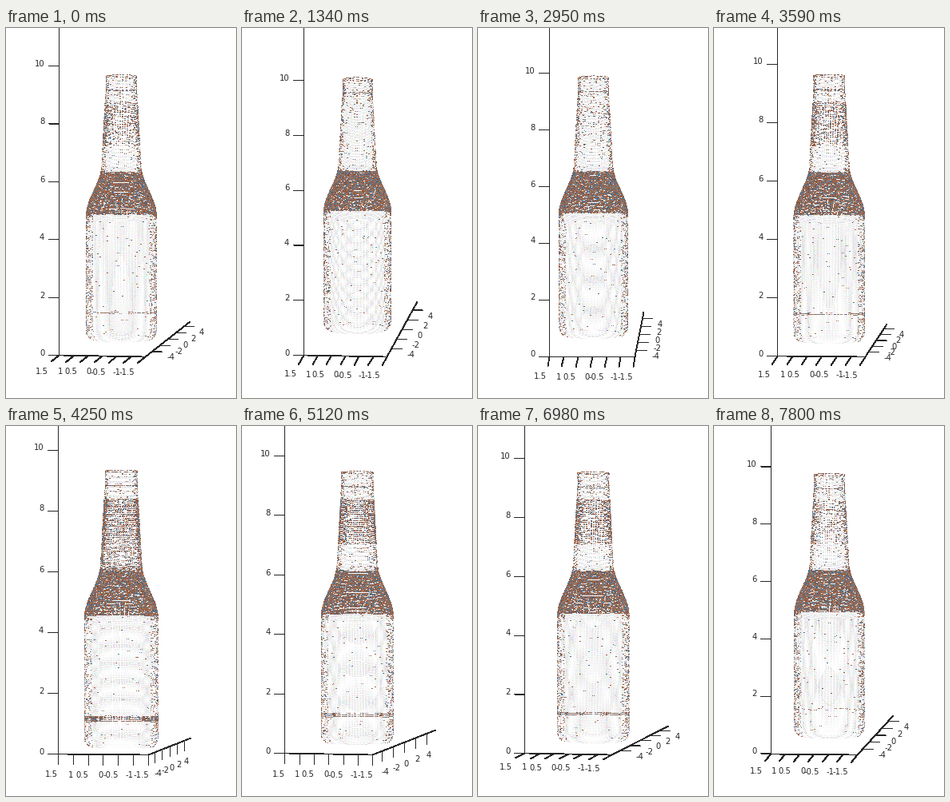
Write a matplotlib script that moves like this. It is 288 by 463 pixels and loops after 9.24 s.

```python
import numpy as np
import matplotlib.pyplot as plt
from matplotlib.animation import FuncAnimation
from matplotlib.colors import hsv_to_rgb

W, H, DPI = 288, 463, 64
PX = 72 / DPI                # one pixel in points
LOOP, STEP = 9240, 30
XR, YR = 1.5, 5.7            # half ranges of the floor
CX, FLOOR = 148.4, 411.5     # screen centre and lowest corner
TICK = 13
INK = "#262626"

# Drag path: time, azimuth, elevation
PATH = np.array([
    (650, 7.75, 6.2), (720, 5.9, 7.2), (1340, 5.5, 10), (2160, 0.2, 9.3),
    (2600, 0.2, 9.2), (3590, 3.7, 5.65), (4220, 7, 2.8), (5120, 10.7, 4.25),
    (5600, 12.6, 3.15), (6190, 12.6, 3.15), (7730, 6.27, 6.87)])

rng = np.random.default_rng(7)


def smooth(u):
    u = np.clip(u, 0, 1)
    return u * u * (3 - 2 * u)


def radius(z):
    """Bottle outline: rounded foot, body, shoulder, tapering neck, lip."""
    neck = 0.69 - 0.055 * (z - 5.75)
    r = 1.21 + (neck - 1.21) * smooth((z - 4.2) / 1.7)
    r -= 0.13 * np.clip(1 - z / 0.25, 0, 1) ** 2
    return np.where(z > 8.45, 0.53, r)


def rings(z0, z1, dz, n):
    th = np.linspace(0, 2 * np.pi, n, endpoint=False)
    z, th = np.meshgrid(np.arange(z0, z1, dz), th, indexing="ij")
    return np.array([z.ravel(), th.ravel()])


Z, TH = np.hstack([rings(0, 4.15, 0.055, 200), rings(4.15, 5.85, 0.035, 230),
                   rings(5.85, 9.05, 0.045, 90)])
N = Z.size
BX, BY = 0.11 + radius(Z) * np.cos(TH), radius(Z) * np.sin(TH)
CHANCE = np.repeat(rng.random(N // 2 + 1), 2)[:N]

# Browns with some slate blue; pastels of any hue
HUE = np.where(rng.random(N) < 0.72, rng.uniform(0.03, 0.08, N),
               rng.uniform(0.55, 0.6, N))
DARK = hsv_to_rgb(np.stack([HUE, rng.uniform(0.35, 0.65, N),
                            rng.uniform(0.5, 0.72, N)], axis=1))
LIGHT = hsv_to_rgb(np.stack([rng.random(N), np.full(N, 0.13),
                             np.full(N, 0.93)], axis=1))


class Camera:
    """Orthographic view scaled so that the whole box fits in height."""

    def __init__(self, az, el):
        a, e = np.radians((az, el))
        self.ca, self.sa, self.ce, self.se = np.cos(a), np.sin(a), np.cos(e), np.sin(e)
        self.s = 528 / (13.3 * self.ce + 2 * self.se * (YR * self.ca + XR * self.sa))
        self.base = FLOOR - self.s * self.se * (YR * self.ca + XR * self.sa)

    def __call__(self, x, y, z):
        depth = y * self.ca + x * self.sa
        return np.array([CX + self.s * (y * self.sa - x * self.ca),
                         self.base - self.s * (z * self.ce + depth * self.se)])


def view(t):
    """The picture is redrawn every 90 ms while dragging."""
    held = t - (t - 80) % 90
    return [np.interp(held, PATH[:, 0], PATH[:, i]) for i in (1, 2)]


def strength(level, edge, el):
    """Share of points in full colour; flat views let the rows pile up."""
    low = np.clip((8.5 - el) / 4.5, 0, 1)
    side = 0.17 * (edge > 0.8)
    band = np.abs(level - 0.89) < 0.03 + 0.07 * np.clip((6 - el) / 3, 0, 1)
    rim = (np.abs(level - 8.57) < 0.03) | (level > 9)
    return np.select(
        [band, level < 4.28, level < 5.74, level < 6.65, level < 8.15, rim],
        [0.85 * np.clip((7.8 - el) / 2.5, 0, 1), 0.012 + side, 0.82,
         0.04 + side + 0.42 * np.clip((4.4 - el) / 1.2, 0, 1),
         0.05 + side + 0.62 * low, 0.7], 0.07 + side)


def bottle(cam, el):
    x, y = cam(BX, BY, Z)
    px, py = x.astype(int), y.astype(int)
    edge = np.abs(np.cos(TH) * cam.ca - np.sin(TH) * cam.sa)
    level = (cam.base - y) / (cam.s * cam.ce)
    on = CHANCE < strength(level, edge, el)
    # Pale dots fade with their place between pixel rows, which gives moire arcs
    fade = 2 * np.abs(y % 1 - 0.5)[:, None]
    pale = 1 - fade * (1 - LIGHT)
    img = np.ones((H, W, 3))
    img[py[~on], px[~on]] = pale[~on]
    img[py[on], px[on]] = DARK[on]
    return img


fig = plt.figure(figsize=(W / DPI, H / DPI), dpi=DPI, facecolor="white")
ax = fig.add_axes([0, 0, 1, 1])
ax.axis("off")
im = ax.imshow(np.ones((H, W, 3)), extent=(0, W, H, 0),
               interpolation="nearest", aspect="auto")
ax.set(xlim=(0, W), ylim=(H, 0))
box, = ax.plot([], [], color=INK, lw=0.8 * PX, antialiased=False,
               solid_capstyle="butt")


def labels(values, ha):
    return [(v, ax.text(0, 0, f"{v:g}", ha=ha, va="baseline", color=INK,
                        family="DejaVu Sans", fontsize=10 * PX))
            for v in values]


XT = labels(np.arange(1.5, -1.6, -0.5), "right")
YT = labels(range(-4, 5, 2), "left")
ZT = labels(range(0, 11, 2), "right")


def place(text, x, y):
    text.set_position((x, y + 3.6))


def update(n):
    az, el = view(n * STEP + 25)
    cam = Camera(az, el)
    im.set_data(bottle(cam, el))

    left, right, far = cam(XR, -YR, 0), cam(-XR, -YR, 0), cam(-XR, YR, 0)
    run, rise = far[0] - right[0], right[1] - far[1]
    flat = run > 2.2 * rise
    across = (right - left) / np.hypot(*(right - left))
    down = np.array([0, 1]) if flat else (right - far) / np.hypot(run, rise)
    side = down if flat else across

    segs = [(cam(XR, -YR, 13), left), (left, right), (right, far)]
    for v, text in XT:
        p = cam(v, -YR, 0)
        segs.append((p, p + TICK * down))
        place(text, p[0] + 17 * down[0], p[1] + 9.6 + 15.4 * down[1])
    for v, text in YT:
        p = cam(-XR, v, 0)
        segs.append((p, p + TICK * side))
        place(text, *(p + ((-1, 26) if flat else (19, 7))))
    for v, text in ZT:
        p = cam(XR, -YR, v)
        segs.append((p, p - TICK * across))
        place(text, p[0] - 18, p[1] - 3.5)

    gap = (np.nan, np.nan)
    pts = np.array([q for a, b in segs for q in (a, b, gap)])
    box.set_data(*(np.floor(pts) + 0.5).T)
    return [im, box] + [text for _, text in XT + YT + ZT]


anim = FuncAnimation(fig, update, frames=LOOP // STEP, interval=STEP,
                     repeat=True, repeat_delay=0, blit=False)
plt.show()
```
